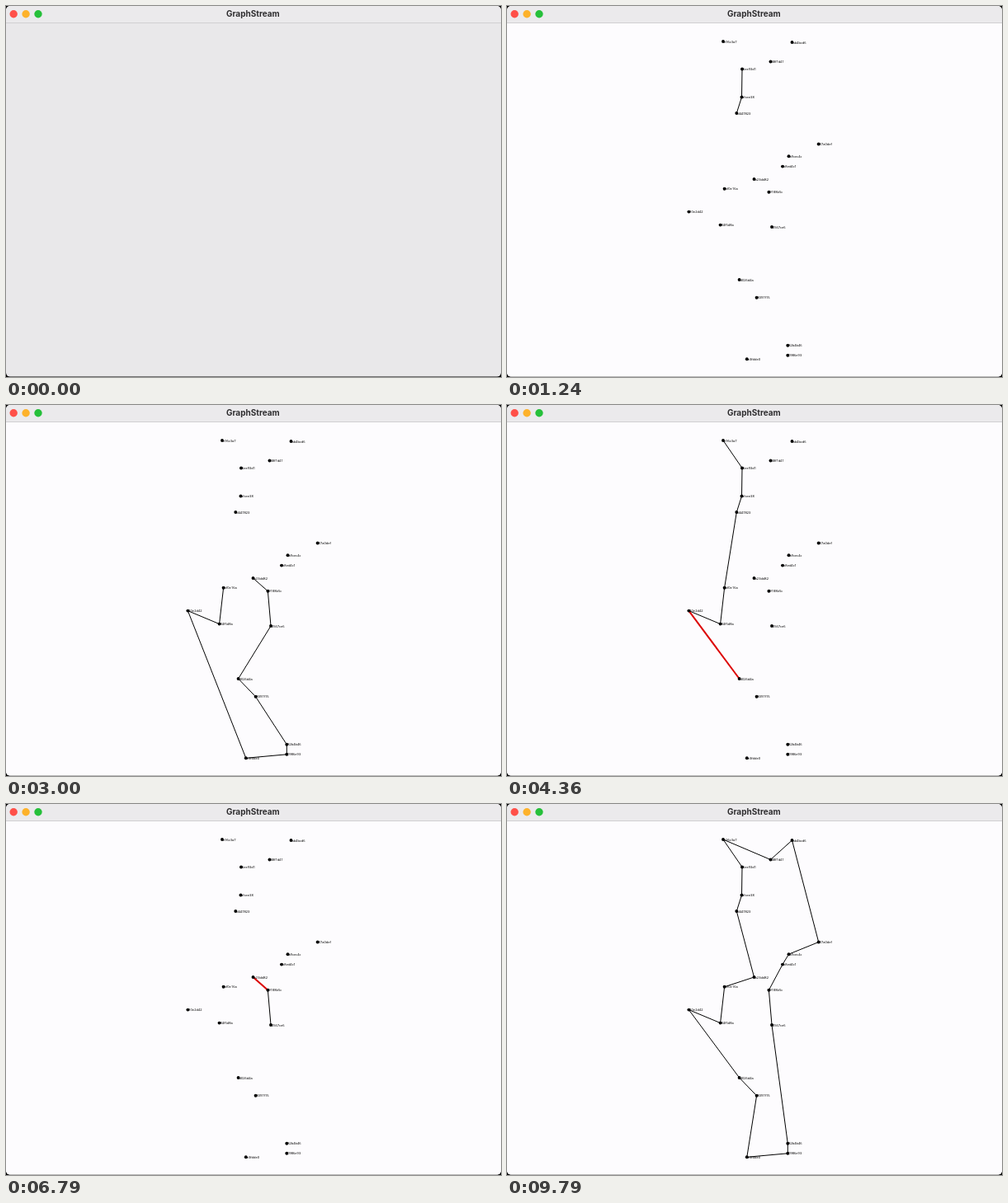
An HTML page that plays this animation: 600 px wide and 450 px high, repeating every 9.82 s.

```html
<!DOCTYPE html>
<html lang="en">
<head>
<meta charset="utf-8">
<title>GraphStream</title>
<style>
  html, body { margin: 0; width: 100%; height: 100%; overflow: hidden; background: #000; }
  svg { display: block; width: 600px; height: 450px; }
  .title { font: 700 10px Inter, "Open Sans", sans-serif; fill: #2f2e30; text-anchor: middle; }
  .label { font: 4px "Noto Sans", "Open Sans", sans-serif; fill: #000; }
  .done { fill: none; stroke: #000; stroke-width: 1; }
  .fresh { fill: none; stroke: #dc0000; stroke-width: 2; }
  #graph { visibility: hidden; animation: open 9820ms step-end infinite; }
  @keyframes open { 0% { visibility: hidden; } 1.222%, 100% { visibility: visible; } }
</style>
</head>
<body>
<svg viewBox="0 0 600 450">
  <clipPath id="frame"><rect width="600" height="449.6" rx="5"/></clipPath>
  <g clip-path="url(#frame)">
    <rect width="600" height="450" fill="#e9e8ea"/>
    <g id="graph">
      <rect y="20" width="600" height="430" fill="#fdfcfe"/>
      <path id="done" class="done"/>
      <path id="fresh" class="fresh"/>
      <g id="nodes"></g>
    </g>
    <rect width="600" height="20" fill="#ebeaec"/>
    <rect y="20" width="600" height="1" fill="#d0cfd1"/>
    <circle cx="9.2" cy="9.8" r="4.7" fill="#ff5049"/>
    <circle cx="24.1" cy="9.8" r="4.7" fill="#fdb22b"/>
    <circle cx="39" cy="9.8" r="4.7" fill="#26c03a"/>
    <text class="title" x="299.3" y="13.1">GraphStream</text>
  </g>
</svg>
<script>
const LOOP = 9820, SIZE = 20;
const $ = id => document.getElementById(id);

// Each node is addressed by its letter in the tours: A, B, C ...
const nodes = [
  ["e96c3a7", 262, 43], ["ab4bcd6", 345.5, 44], ["48f7d41", 319.5, 67.5],
  ["6ee93d1", 285, 76.5], ["cfcee38", 284.5, 110.5], ["d447823", 278.3, 130],
  ["07a0def", 377.7, 167.5], ["b9cec4c", 341.5, 182.2], ["b8ed4c1", 334, 194.6],
  ["b23dd82", 299.5, 210], ["bf0e16a", 263.6, 221.8], ["9188b5c", 317.4, 225.8],
  ["10e2d42", 220.4, 249.6], ["84f5d8a", 258.6, 265.6], ["0567ce6", 321, 268],
  ["d026d4a", 281.6, 332], ["8397f15", 302.6, 353.8], ["82b4b46", 340.3, 411.8],
  ["0986e93", 340.3, 423.8], ["e3fdde0", 290.8, 428.3]
];

const tours = [
  "OPQRSTMNKFEDACBGHIJL",
  "DEFKNMTSRQPOLJIHGBCA",
  "KNMTSRQPOLJIHGBCADEF",
  "ADEFKNMPQTSROLJIHGBC",
  "LJKNMPQTSROIHGBCADEF",
  "OLJIHGBCDAFEKNMPQTSR",
  "PQTSROLIHGBCADEFJKNM"
];

// Time in ms against edges drawn; an edge is red for the first half of its unit.
const pace = [
  [120, 0], [1230, 21.5], [1300, 22], [2995, 49.5], [3030, 50],
  [4350, 66], [4390, 66.5], [5750, 86.5], [5790, 87], [7845, 116],
  [7880, 116.5], [8110, 120], [9120, 135], [9390, 137.5], [9580, 138],
  [9785, 139.5], [9820, 139.9]
];

$("nodes").innerHTML = nodes.map(([name, x, y]) =>
  `<circle cx="${x}" cy="${y}" r="1.95"/><text class="label" x="${x + 0.9}" y="${y + 1.5}">${name}</text>`
).join("");

function edgesAt(t) {
  if (t <= pace[0][0]) return 0;
  const i = pace.findIndex(p => p[0] > t);
  const [t0, n0] = pace[i - 1], [t1, n1] = pace[i];
  return n0 + (n1 - n0) * (t - t0) / (t1 - t0);
}

function point(tour, i) {
  const [, x, y] = nodes[tour.charCodeAt(i % SIZE) - 65];
  return `${x} ${y}`;
}

function trace(tour, from, to) {
  if (to <= from) return "";
  let d = "M" + point(tour, from);
  for (let i = from + 1; i <= to; i++) d += "L" + point(tour, i);
  return d;
}

function draw(t) {
  const n = edgesAt(t);
  const tour = tours[Math.floor(n / SIZE)];
  const k = Math.floor(n % SIZE);
  const red = n % 1 < 0.5;
  $("done").setAttribute("d", trace(tour, 0, red ? k : k + 1));
  $("fresh").setAttribute("d", red ? trace(tour, k, k + 1) : "");
}

// Share one clock between the stylesheet animation and the drawing.
const clock = $("graph").getAnimations()[0];
const start = performance.now();
if (clock) clock.startTime = document.timeline.currentTime;

function tick() {
  draw((performance.now() - start) % LOOP);
  requestAnimationFrame(tick);
}
tick();
</script>
</body>
</html>
```
